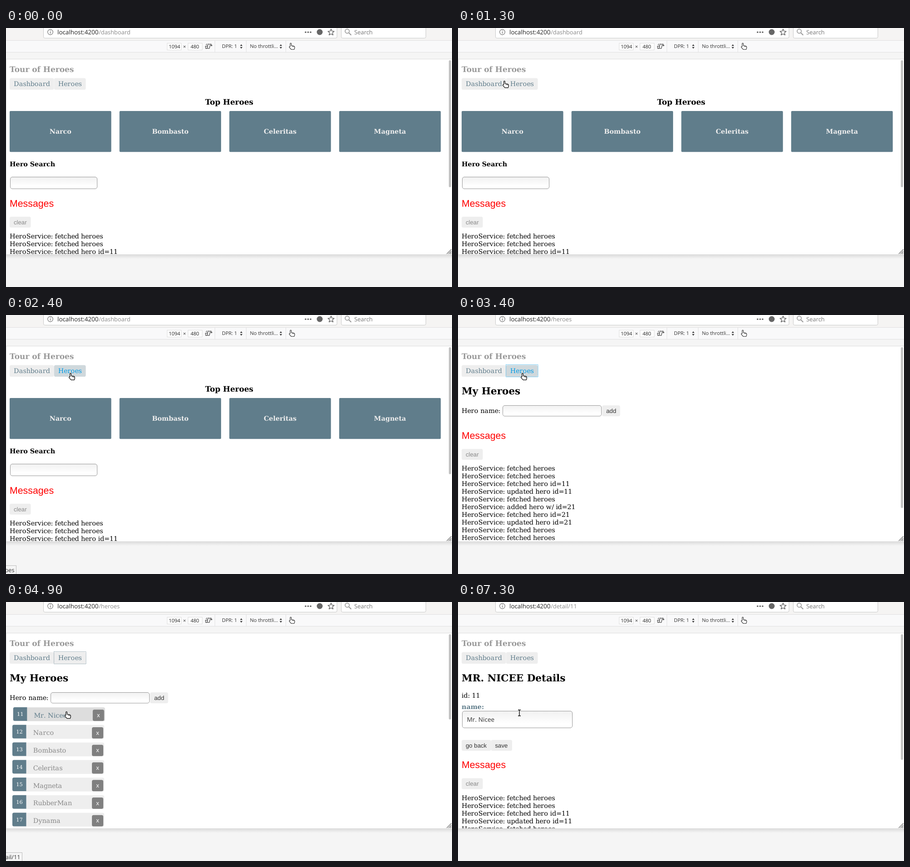
An HTML page that plays this animation: 981 px wide and 571 px high, repeating every 8000 ms.

```html
<!DOCTYPE html>
<html lang="en">
<head>
<meta charset="utf-8">
<title>Hero dashboard demo</title>
<style>
html, body { margin: 0; width: 100%; height: 100%; overflow: hidden; background: #f5f5f5; }
svg { display: block; width: 981px; height: 571px; }
text { text-rendering: geometricPrecision; white-space: pre; }
.serif { font-family: "DejaVu Serif", serif; }
.ui { font-family: "Open Sans", "Noto Sans", sans-serif; }
.arial { font-family: "Liberation Sans", Arial, sans-serif; }
</style>
</head>
<body>
<svg id="stage" viewBox="0 0 981 571" xmlns="http://www.w3.org/2000/svg"></svg>
<script>
const LOOP = 8000;
const ZOOM = 981 / 1094;   // page zoom inside the device view
const BODY = 16 * ZOOM;
const SLATE = '#607d8b';
const $ = id => document.getElementById(id);
const pen = document.createElement('canvas').getContext('2d');
pen.font = '160px "DejaVu Serif", serif';

const rect = (x, y, w, h, fill, r = 0, extra = '') =>
  `<rect x="${x}" y="${y}" width="${w}" height="${h}" rx="${r}" fill="${fill}" ${extra}/>`;
const text = (x, y, s, cls, size, fill = '#000', extra = '') =>
  `<text x="${x}" y="${y}" class="${cls}" font-size="${size}" fill="${fill}" ${extra}>${s}</text>`;
const line = (d, stroke, w = 1) => `<path d="${d}" fill="none" stroke="${stroke}" stroke-width="${w}"/>`;
const group = (id, s) => `<g id="${id}">${s}</g>`;

// Body text: glyph advances rounded to whole page pixels, then zoomed.
function body(x, y, s, fill = '#000', extra = '') {
  const xs = [];
  for (const c of s) {
    xs.push(x.toFixed(2));
    x += Math.round(pen.measureText(c).width / 10) * ZOOM;
  }
  return text(xs.join(' '), y, s, 'serif', BODY, fill, extra);
}
const bold = (x, y, s, size = BODY, fill = '#000', anchor = 'start') =>
  text(x, y, s, 'serif', size, fill, `font-weight="700" text-anchor="${anchor}"`);
const button = (x, y, w, s, fill = '#333') =>
  rect(x, y, w, 24, '#eee', 3.5) + text(x + 9, y + 16.8, s, 'arial', 13.2, fill);
const field = (x, y, w, h) => rect(x, y, w, h, 'url(#inner)', 4.5, 'stroke="#999"');
const thumb = end => rect(974, 71, 5, end - 71, '#c3c3c3', 2.5);

const log = ('fetched heroes|fetched heroes|fetched hero id=11|updated hero id=11|fetched heroes|' +
  'added hero w/ id=21|fetched hero id=21|updated hero id=21|fetched heroes|fetched heroes|' +
  'found heroes matching "m"|fetched heroes|deleted hero id=21|fetched heroes|fetched heroes').split('|');

const messages = y =>
  text(8, y, 'Messages', 'arial', 21.3, '#f00') +
  button(8, y + 22.6, 46.5, 'clear', '#888') +
  log.map((m, i) => {
    const base = y + 70.5 + i * 19 * ZOOM;
    return base < 515 ? body(8, base, 'HeroService: ' + m) : '';
  }).join('');

const HAND = 'M2.9 8.4V1.7a1.35 1.35 0 0 1 2.7 0V6l5.8 1.1q2 .5 2 2.2V12l-1.1 3.2H5.4L1 10.3q-.6-1.6.7-2Z';
const hand = (stroke, w) => `<path d="${HAND}" fill="#fff" stroke="${stroke}" stroke-width="${w}" stroke-linejoin="round"/>` +
  line('M7.6 7v2M9.7 7.4v2M11.6 7.8v2', stroke, .8);

function star(cx, cy, R) {
  const p = [];
  for (let i = 0; i < 10; i++) {
    const a = i * Math.PI / 5, r = i % 2 ? R * .46 : R;
    p.push((cx + r * Math.sin(a)).toFixed(1) + ' ' + (cy - r * Math.cos(a)).toFixed(1));
  }
  return `<path d="M${p.join('L')}Z" fill="none" stroke="#555" stroke-width="1.3" stroke-linejoin="round"/>`;
}
const updown = x => `<path d="M${x - 2.7} 39.4l2.7-3.4 2.7 3.4ZM${x - 2.7} 42l2.7 3.4 2.7-3.4Z" fill="#333"/>`;

function browser() {
  const dots = [659, 664.5, 670].map(x => `<circle cx="${x}" cy="9.2" r="1.8" fill="#666"/>`).join('');
  const seps = [459.5, 528.5, 615.5].map(x => `M${x} 28V53`).join('');
  return rect(0, 0, 981, 571, '#f5f5f5') + rect(0, 0, 981, 27, '#f5f4f3') +
    rect(82.5, -8, 645.5, 30.3, '#fff', 3, 'stroke="#c8c8c8"') +
    rect(737.5, -8, 186, 30.3, '#fff', 3, 'stroke="#c8c8c8"') +
    '<circle cx="97.5" cy="9" r="5.8" fill="none" stroke="#737373" stroke-width="1.2"/>' +
    line('M97.5 8.2v4M97.5 5.4v1.5', '#737373', 1.4) +
    text(113, 14, 'localhost:4200', 'ui', 13.4, '#222') +
    text(204, 14, '', 'ui', 12.9, '#8a8a8a', 'id="path"') +
    dots + '<circle cx="690" cy="9" r="6.5" fill="#666"/>' + star(715, 9.6, 7.3) +
    '<circle cx="750.5" cy="7" r="4.6" fill="none" stroke="#999" stroke-width="1.7"/>' +
    line('M754 10.5l5.3 5.3', '#999', 2) +
    text(766, 14, 'Search', 'ui', 12.9, '#777') +
    rect(0, 27, 981, 26, '#f9f9fa') + line('M0 27.5H981M0 53.5H981' + seps, '#e0e0e1') +
    rect(354.5, 33.5, 31, 15, '#fff', 0, 'stroke="#ddd"') +
    rect(400.5, 33.5, 31, 15, '#fff', 0, 'stroke="#ddd"') +
    text(358, 45, '1094', 'ui', 11, '#222') + text(389.5, 45, '×', 'ui', 11, '#333') +
    text(406, 45, '480', 'ui', 11, '#222') +
    `<g fill="none" stroke="#333" stroke-width="1.1"><rect x="443.5" y="35.5" width="5" height="9.5" rx="1" transform="rotate(14 446 40)"/>
     <path d="M443 39.5l-4.4 1 1 4.8 4-.6M449.5 34.8q3 1 2.5 4.4M440 37.5q.5-2 2.7-2.3M450.5 38l1.5 1.5 1.5-1.5"/></g>` +
    text(475, 44.4, 'DPR: 1', 'ui', 10.9, '#333') + updown(517.5) +
    text(536.5, 44.4, 'No throttli…', 'ui', 11.1, '#333') + updown(604.5) +
    `<g transform="translate(622.3 33) scale(.94)">${hand('#222', 1.1)}</g>` +
    rect(0, 499, 981, 10, 'url(#shade)') +
    rect(0.5, 68.5, 985, 431, '#fff', 0, 'stroke="#dcdcdc"') +
    line('M969.5 498l10-10M973.5 498l6-6M977 498l2.5-2.5', '#777', 1.1);
}

function nav() {
  return bold(8, 97, 'Tour of Heroes', 17, '#999') +
    rect(8, 110.5, 97.5, 25.5, '#eee', 3.6) + body(17, 128, 'Dashboard', SLATE) +
    rect(105.7, 110.5, 69.8, 25.5, '#eee', 3.6, 'id="link"') + body(114.7, 128, 'Heroes', SLATE, 'id="linkText"') +
    rect(105.5, 109.5, 70.5, 27, 'none', 0, 'id="focus" stroke-dasharray="1 1"');
}

function dashboard() {
  const cards = ['Narco', 'Bombasto', 'Celeritas', 'Magneta'].map((n, i) => {
    const x = 8 + i * 241.6;
    return rect(x, 183, 223.5, 90.2, SLATE, 2) + bold(x + 111.8, 233, n, BODY, '#eee', 'middle');
  }).join('');
  return bold(491, 169, 'Top Heroes', 16.8, '#000', 'middle') + cards +
    bold(8, 304.8, 'Hero Search') + field(9.5, 328.5, 191, 26) + messages(393.5) + thumb(351);
}

function heroRow(name, i) {
  const y = 232 + i * 38.75;
  return `<g id="row${i}">` + rect(14, y + .3, 202, 30.4, '#eee', 3.5, `id="rowBox${i}"`) +
    `<path d="M44.5 ${y}H17.5q-3.5 0-3.5 3.5V${y + 26.5}q0 3.5 3.5 3.5H44.5Z" fill="${SLATE}"/>` +
    text(29.4, y + 19.3, 11 + i, 'serif', 11.4, '#fff', 'text-anchor="middle"') +
    body(59.8, y + 22.5, name, '#888', `id="rowText${i}"`) +
    rect(189, y + 5.3, 25, 25, '#808080', 3.6) +
    text(201.5, y + 21.8, 'x', 'arial', 13.2, '#fff', 'text-anchor="middle"') + '</g>';
}
const names = ['Mr. Nicee', 'Narco', 'Bombasto', 'Celeritas', 'Magneta', 'RubberMan', 'Dynama'];

const heroesTop = () => bold(8, 175, 'My Heroes', 21.5) + body(8, 216, 'Hero name:') +
  field(98.5, 199.5, 217, 23.5) + button(317, 199.2, 39.5, 'add');

const detail = () => bold(8, 175, 'MR. NICEE Details', 21.5) + body(8, 211, 'id: 11') +
  bold(8, 236, 'name:', BODY, SLATE) + field(9.5, 240.5, 242, 37) +
  text(19.5, 264, 'Mr. Nicee', 'ui', 13.7, '#333') +
  button(8, 304, 64.5, 'go back') + button(72.5, 304, 46.5, 'save') + messages(366) + thumb(348);

$('stage').innerHTML = `<defs>
  <linearGradient id="inner" x1="0" y1="0" x2="0" y2="1"><stop stop-color="#f1f1f1"/><stop offset=".75" stop-color="#fff"/></linearGradient>
  <linearGradient id="shade" x1="0" y1="0" x2="0" y2="1"><stop stop-color="#dadada"/><stop offset="1" stop-color="#f5f5f5"/></linearGradient>
  <clipPath id="view"><rect x="1" y="69" width="980" height="430"/></clipPath></defs>` +
  browser() + '<g clip-path="url(#view)">' + nav() +
  group('dashboard', dashboard()) + group('heroesTop', heroesTop()) +
  group('loading', messages(272.6) + thumb(425.5)) +
  group('list', names.map(heroRow).join('') + thumb(259)) +
  group('empty', messages(174.4)) + group('detail', detail()) + '</g>' +
  line('M969.5 498l10-10M973.5 498l6-6M977 498l2.5-2.5', '#888', 1.1) +
  group('status', rect(-2, 552.5, 10, 22, '#f5f5f5', 0, 'id="statusBox" stroke="#bdbdbd"') +
    text(0, 567.3, '', 'ui', 12.7, '#333', 'id="statusText" text-anchor="end"')) +
  group('arrow', '<path d="M.5.5V14.5L4 11.5 6.3 17 8.7 16 6.3 10.7H11Z" fill="#000" stroke="#fff"/>') +
  group('hand', `<g transform="translate(-4.2 0)">${hand('#000', 1.2)}</g>`) +
  group('beam', line('M-3.5-6.5h7M0-7V7M-3.5 6.5h7', '#fff', 3.4) + line('M-3-6.5h2q1 0 1 1 0-1 1-1h2M0-6V6M-3 6.5h2q1 0 1-1 0 1 1 1h2', '#000', 1.4));

// time, x, y, pointer shape
const track = [
  [700, 632, 4, 'arrow'], [800, 590, 22, 'arrow'], [1000, 330, 104, 'arrow'], [1100, 180, 136, 'arrow'],
  [1200, 67, 141, 'arrow'], [1300, 102, 116.5, 'hand'], [1500, 98, 119, 'hand'], [1800, 98, 119, 'hand'],
  [2400, 142, 128, 'hand'], [3800, 142, 128, 'hand'], [3900, 141, 175, 'arrow'], [4000, 141, 175, 'arrow'],
  [4100, 146, 203, 'beam'], [4200, 146, 212, 'beam'], [4400, 146, 212, 'beam'], [4500, 134, 238, 'hand'],
  [4600, 134, 238, 'hand'], [4700, 133, 241.5, 'hand'], [6700, 133, 241.5, 'hand'],
  [6800, 135, 244.5, 'beam'], [8000, 135, 244.5, 'beam']
];

const show = (id, on) => $(id).style.display = on ? '' : 'none';

function pointer(t) {
  const i = track.findLastIndex(k => k[0] <= t), a = track[i];
  for (const kind of ['arrow', 'hand', 'beam']) show(kind, a && a[3] === kind);
  if (!a) return;
  const b = track[i + 1] || a, f = b === a ? 0 : (t - a[0]) / (b[0] - a[0]);
  const at = n => a[n] + (b[n] - a[n]) * f;
  $(a[3]).setAttribute('transform', `translate(${at(1)} ${at(2)})`);
}

function status(t) {
  const nav = t >= 2300 && t < 3400, row = t >= 4900 && t < 6900;
  show('status', nav || row);
  const right = nav ? 22.5 : 35.5;
  $('statusBox').setAttribute('width', right + 2);
  $('statusText').setAttribute('x', right - 4);
  $('statusText').textContent = 'localhost:4200/' + (nav ? 'heroes' : 'detail/11');
  $('status').setAttribute('opacity', t >= 6800 ? .2 : 1);
}

function draw(ms) {
  const t = Math.floor(ms / 100) * 100;
  const dash = t < 3400, heroes = !dash && t < 6800;
  show('dashboard', dash);
  show('heroesTop', heroes);
  show('loading', heroes && t < 3600);
  show('list', heroes && t >= 3600);
  show('empty', t >= 6800 && t < 7300);
  show('detail', t >= 7300);
  $('path').textContent = dash ? '/dashboard' : heroes ? '/heroes' : '/detail/11';

  const hot = t >= 2000 && t < 3900;
  $('link').setAttribute('fill', hot ? '#cfd8dc' : '#eee');
  $('linkText').setAttribute('fill', hot ? '#039be5' : SLATE);
  show('focus', heroes);
  $('focus').setAttribute('stroke', hot ? '#039be5' : SLATE);

  const over = t >= 4500;
  $('row0').setAttribute('transform', `translate(${over ? 1.8 : 0} 0)`);
  $('rowBox0').setAttribute('fill', over ? '#ddd' : '#eee');
  $('rowText0').setAttribute('fill', over ? SLATE : '#888');
  status(t);
  pointer(t);
}

const start = performance.now();
function tick() {
  draw((performance.now() - start) % LOOP);
  requestAnimationFrame(tick);
}
tick();
</script>
</body>
</html>
```
